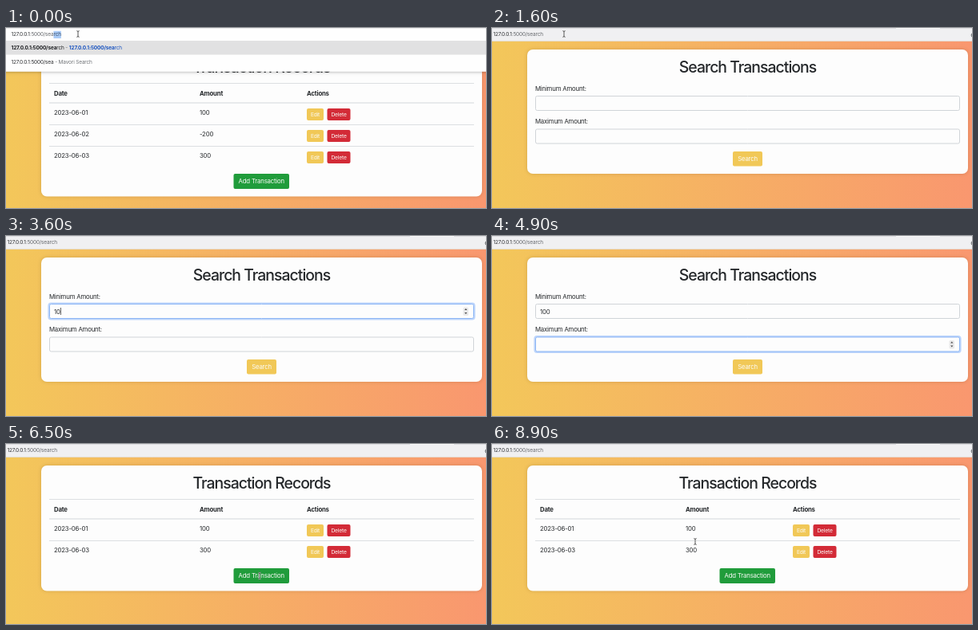
An HTML page with a canvas that plays this animation: 600x226 px, repeating every 9 s.

```html
<!DOCTYPE html>
<html lang="en">
<head>
<meta charset="utf-8">
<title>Transaction search</title>
<style>
  html, body { margin: 0; width: 100%; height: 100%; overflow: hidden; background: #f3c75a; }
  canvas { display: block; width: 600px; height: 226px; }
</style>
</head>
<body>
<canvas id="stage"></canvas>
<script>
const W = 600, H = 226, LOOP = 9000, STEP = 100;
const canvas = document.getElementById('stage');
const ctx = canvas.getContext('2d');
const dpr = window.devicePixelRatio || 1;
canvas.width = W * dpr;
canvas.height = H * dpr;

const INK = '#25282b', LINE = '#dcdfe2', CARD = '#fdfdfd';
const YELLOW = '#f1c857', RED = '#d32b37', GREEN = '#209c3b', BLUE = '#1c55c0';
const HOST = '127.0.0.1', PATH = ':5000/';
const BODY = 7.8, SMALL = 6.7, BAR = 6.5;

const RECORDS = [['2023-06-01', '100'], ['2023-06-02', '-200'], ['2023-06-03', '300']];

// Each entry: start time, typed value
const ADDRESS = [[0, 'sea'], [1000, 'sear'], [1200, 'searc'], [1300, 'search']];
const MINIMUM = [[2700, ''], [3400, '1'], [3600, '10'], [3800, '100']];
const MAXIMUM = [[4400, ''], [5000, '3'], [5200, '30'], [5400, '300']];
const OPEN_FORM = 1500, OPEN_RESULTS = 6200;
const FOCUS_MIN = 2600, FOCUS_MAX = 4400, BLUR = 6200;

// Pointer: time, x, y
const POINTER = [
  [0, 90, 7.5], [1900, 90, 7.5], [2200, 180, 95], [5500, 180, 95], [6000, 317, 165.5],
  [7900, 317, 165.5], [8400, 130, 107], [8900, 254, 122.5]
];

function rect(x, y, w, h, color) {
  ctx.fillStyle = color;
  ctx.fillRect(x, y, w, h);
}

function round(x, y, w, h, r, fill, stroke, line = 1) {
  ctx.beginPath();
  ctx.roundRect(x, y, w, h, r);
  if (fill) { ctx.fillStyle = fill; ctx.fill(); }
  if (stroke) { ctx.strokeStyle = stroke; ctx.lineWidth = line; ctx.stroke(); }
}

// Draws text and returns the x where it ends
function text(str, x, y, { size = BODY, weight = 400, color = INK, align = 'left', track = -0.026 } = {}) {
  ctx.font = `${weight} ${size}px Inter, sans-serif`;
  ctx.letterSpacing = `${size * track}px`;
  ctx.textAlign = align;
  ctx.fillStyle = color;
  ctx.fillText(str, x, y);
  return x + ctx.measureText(str).width;
}

function typed(keys, t) {
  let current = { at: 0, value: '' };
  for (const [at, value] of keys) if (t >= at) current = { at, value };
  return current;
}

const blinkOn = (t, since) => Math.floor((t - since) / 500) % 2 === 0;

function background() {
  const g = ctx.createLinearGradient(0, 0, W, 0);
  g.addColorStop(0, '#f3c75a');
  g.addColorStop(1, '#f9976f');
  rect(0, 0, W, H, g);
}

function card(bottom, title) {
  ctx.save();
  ctx.shadowColor = 'rgba(90,50,0,0.22)';
  ctx.shadowBlur = 5 * dpr;
  round(44, 27, 551, bottom - 27, 7, CARD);
  ctx.restore();
  text(title, 319.5, 55.8, { size: 19.4, weight: 500, align: 'center', track: -0.05 });
}

function button(x, y, w, h, label, color, size = BODY) {
  round(x, y, w, h, 2, color);
  text(label, x + w / 2, y + h / 2 + size * 0.36, { size, color: '#fbfbf8', align: 'center' });
}

function records(rows) {
  const end = 94 + rows.length * 27;
  card(end + 36.5, 'Transaction Records');
  rect(54, 69, 531, 1, LINE);
  [['Date', 60], ['Amount', 242], ['Actions', 376]].forEach(([name, x]) =>
    text(name, x, 85, { weight: 700 }));
  rect(54, 93.5, 531, 1, '#d3d7db');
  rows.forEach(([date, amount], i) => {
    const y = 94 + i * 27;
    if (i) rect(54, y, 531, 1, LINE);
    text(date, 60, y + 15);
    text(amount, 242, y + 15);
    button(376, y + 7, 21, 15, 'Edit', YELLOW, SMALL);
    button(401.5, y + 7, 29, 15, 'Delete', RED, SMALL);
  });
  button(284.5, end + 8, 69.5, 19, 'Add Transaction', GREEN);
}

function spinner(y) {
  round(571.5, y - 5, 6.5, 10.5, 1.5, '#e9e9ea');
  ctx.fillStyle = '#4a4a4a';
  for (const d of [-1, 1]) {
    ctx.beginPath();
    ctx.moveTo(573.2, y + d * 1.6);
    ctx.lineTo(576.4, y + d * 1.6);
    ctx.lineTo(574.8, y + d * 3.5);
    ctx.fill();
  }
}

function field(label, top, keys, t, from, to) {
  const { at, value } = typed(keys, t);
  const focused = t >= from && t < to;
  text(label, 54, top - 6.4);
  if (focused) {
    ctx.globalAlpha = t < from + STEP ? 0.5 : 1;
    round(53.4, top - 0.6, 532.2, 20.2, 2.8, null, '#bdd5fb', 2);
    ctx.globalAlpha = 1;
  }
  round(54.5, top + 0.5, 530, 18, 2, CARD, focused ? '#8db6f5' : '#d0d4d8');
  const end = text(value, 60, top + 12.7);
  if (!focused) return;
  spinner(top + 9.5);
  if (blinkOn(t, Math.max(at, from))) rect(end + 0.3, top + 5, 0.7, 9, '#222');
}

function form(t) {
  card(183, 'Search Transactions');
  field('Minimum Amount:', 85, MINIMUM, t, FOCUS_MIN, FOCUS_MAX);
  field('Maximum Amount:', 126.5, MAXIMUM, t, FOCUS_MAX, BLUR);
  button(301, 155, 37, 18.5, 'Search', YELLOW);
}

function address(x, word) {
  const end = text(HOST, x, 10.4, { size: BAR, color: '#2e3033' });
  return text(PATH + word, end, 10.4, { size: BAR, color: '#66696d' });
}

function toolbar() {
  rect(0, 0, W, 16.5, '#f0f0f2');
  rect(0, 0, W, 1, '#dedfe2');
  rect(505, 0, 55, 1, '#fafafa');
  rect(0, 16, W, 0.7, '#e2dcd2');
  address(1.5, 'search');
  ctx.beginPath();
  ctx.arc(601.5, 9, 2.4, 0, 7);
  ctx.strokeStyle = '#55585c';
  ctx.lineWidth = 0.9;
  ctx.stroke();
}

function suggestions(t) {
  const { at, value } = typed(ADDRESS, t);
  const rest = 'search'.slice(value.length);
  ctx.save();
  ctx.shadowColor = 'rgba(0,0,0,0.35)';
  ctx.shadowBlur = 4 * dpr;
  rect(-5, 0, W + 10, 54.8, '#fefefe');
  ctx.restore();
  rect(0, 0, W, 1, '#ececee');
  rect(0, 16, W, 17.5, '#e1e1e2');

  const end = address(6.5, value);
  if (rest) {
    ctx.font = `400 ${BAR}px Inter, sans-serif`;
    rect(end, 3.8, ctx.measureText(rest).width, 9.2, '#a9cbf7');
    text(rest, end, 10.4, { size: BAR, color: '#3f5068' });
  } else if (blinkOn(t, at)) {
    rect(end + 0.2, 4, 0.7, 9, '#333');
  }

  const match = (x, color) => {
    const mid = text(HOST + PATH + value, x, 27.3, { size: BAR, weight: 700, color });
    return text(rest, mid, 27.3, { size: BAR, color });
  };
  const dash = text(' - ', match(6.5, '#1f2124'), 27.3, { size: BAR, color: '#6b6e72' });
  match(dash, BLUE);

  const query = text(HOST + PATH + value, 6.5, 45.2, { size: BAR, color: '#2b2d30' });
  text(' - Mavori Search', query, 45.2, { size: BAR, color: '#717478' });
}

function pointer(t) {
  if (t >= 3400 && t < 5600) return;
  const i = POINTER.findLastIndex(([at]) => t >= at);
  const a = POINTER[i], b = POINTER[i + 1] || a;
  const p = b === a ? 0 : (t - a[0]) / (b[0] - a[0]);
  const s = p * p * (3 - 2 * p);
  const x = a[1] + (b[1] - a[1]) * s, y = a[2] + (b[2] - a[2]) * s;
  const beam = (color, width) => {
    ctx.beginPath();
    for (const d of [-1, 1]) {
      ctx.moveTo(x - 1.6, y + d * 3.9);
      ctx.quadraticCurveTo(x, y + d * 3.8, x, y + d * 2.8);
      ctx.quadraticCurveTo(x, y + d * 3.8, x + 1.6, y + d * 3.9);
    }
    ctx.moveTo(x, y - 3);
    ctx.lineTo(x, y + 3);
    ctx.strokeStyle = color;
    ctx.lineWidth = width;
    ctx.stroke();
  };
  beam('rgba(255,255,255,0.7)', 1.8);
  beam('#2a2a2a', 0.8);
}

function draw(now) {
  const t = Math.floor((now % LOOP) / STEP) * STEP;
  ctx.setTransform(dpr, 0, 0, dpr, 0, 0);
  background();
  if (t < OPEN_FORM) {
    records(RECORDS);
    suggestions(t);
  } else {
    if (t < OPEN_RESULTS) form(t);
    else records(RECORDS.filter(([, amount]) => amount >= 100 && amount <= 300));
    toolbar();
  }
  pointer(t);
}

const start = performance.now();
function tick() {
  draw(performance.now() - start);
  requestAnimationFrame(tick);
}
tick();
</script>
</body>
</html>
```
